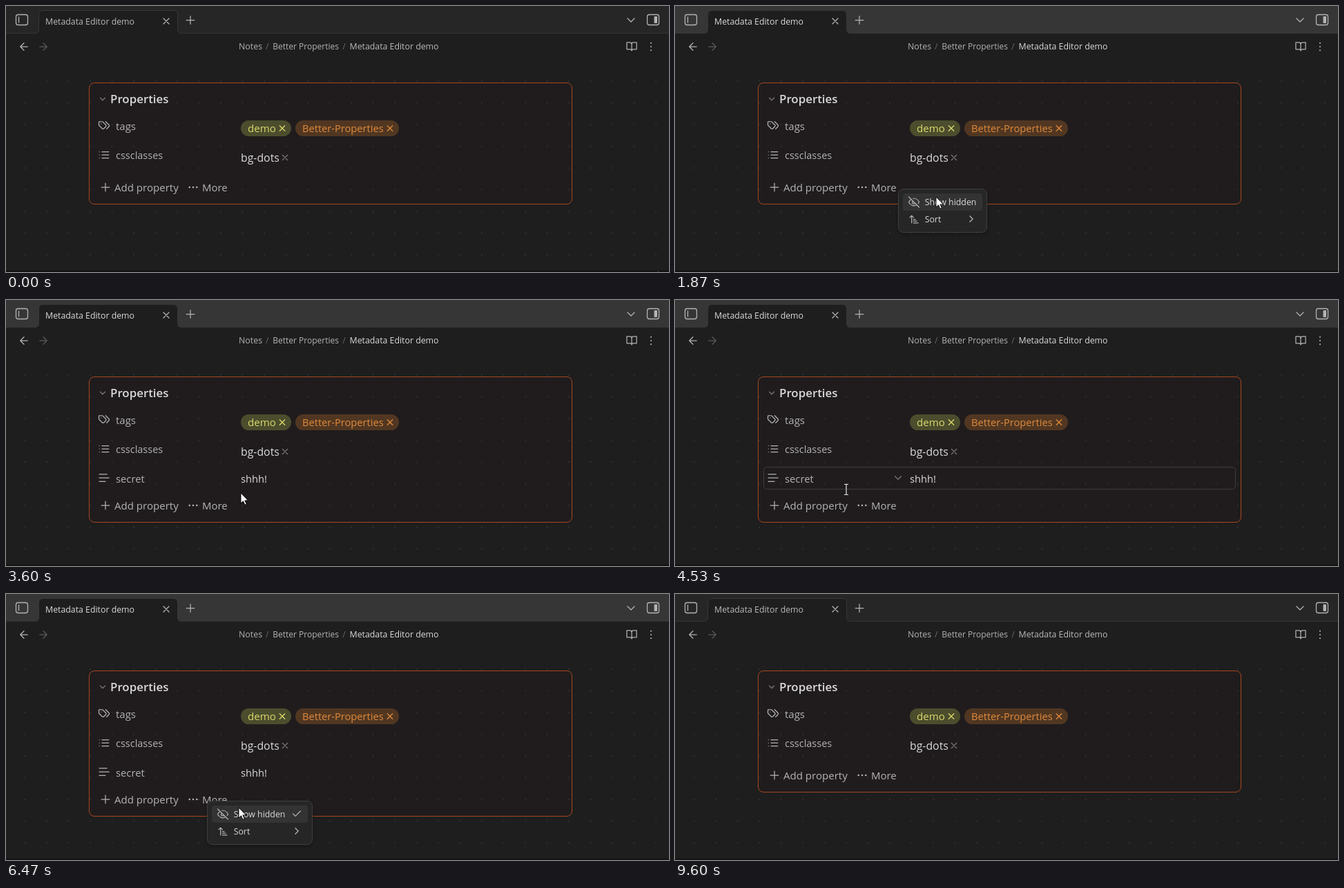
These frames come from a looping animation (960x386 px, 10 s). An HTML page:

```html
<!DOCTYPE html>
<html lang="en">
<head>
<meta charset="utf-8">
<title>Metadata Editor demo</title>
<style>
  html, body { margin: 0; width: 100%; height: 100%; overflow: hidden; background: #1e1e1e; }
  svg { display: block; font-family: "Open Sans", "Noto Sans", sans-serif; }
  .icon { fill: none; stroke-linecap: round; stroke-linejoin: round; }
</style>
</head>
<body>
<svg id="stage" width="960" height="386" viewBox="0 0 960 386"></svg>
<script>
const LOOP = 10000, STEP = 1000 / 15;
const MUTED = '#b3b3b3', BRIGHT = '#dadada', FAINT = '#666';

const ICONS = {
  panel: 'M4 2h16a2 2 0 0 1 2 2v16a2 2 0 0 1-2 2H4a2 2 0 0 1-2-2V4a2 2 0 0 1 2-2z',
  down: 'm6 9 6 6 6-6',
  right: 'm9 18 6-6-6-6',
  plus: 'M5 12h14M12 5v14',
  close: 'M18 6 6 18M6 6l12 12',
  back: 'm12 19-7-7 7-7M19 12H5',
  forward: 'M5 12h14m-7-7 7 7-7 7',
  book: 'M2 4h6a4 4 0 0 1 4 4v13a3 3 0 0 0-3-3H2zM22 4h-6a4 4 0 0 0-4 4v13a3 3 0 0 1 3-3h7z',
  tags: 'm15 5 6.3 6.3a2.4 2.4 0 0 1 0 3.4L17 19M9.6 5.6A2 2 0 0 0 8.2 5H3a1 1 0 0 0-1 1v5.2a2 2 0 0 0 .6 1.4l5.7 5.7a2.4 2.4 0 0 0 3.4 0l3.6-3.6a2.4 2.4 0 0 0 0-3.4zM6.5 9.5h.01',
  list: 'M8 6h13M8 12h13M8 18h13M3 6h.01M3 12h.01M3 18h.01',
  lines: 'M17 5H2M21 12H2M14 19H2',
  dots: 'M5 12h.01M12 12h.01M19 12h.01',
  vdots: 'M12 5v.01M12 12v.01M12 19v.01',
  eyeOff: 'M9.9 9.9a3 3 0 1 0 4.2 4.2M10.7 5.1A10.4 10.4 0 0 1 12 5c7 0 10 7 10 7a13.2 13.2 0 0 1-1.7 2.7M6.6 6.6A13.5 13.5 0 0 0 2 12s3 7 10 7a9.7 9.7 0 0 0 5.4-1.6M2 2l20 20',
  sort: 'm3 8 4-4 4 4M7 4v16M11 12h4M11 16h7M11 20h10',
  check: 'M20 6 9 17l-5-5'
};

// Icons are centred on x, y; weight is the line width in stage pixels.
function icon(name, x, y, size = 18, color = MUTED, weight = 1.25) {
  const k = size / 24;
  return `<path class="icon" d="${ICONS[name]}" stroke="${color}" stroke-width="${weight / k}"
    transform="translate(${x - size / 2} ${y - size / 2}) scale(${k})"/>`;
}
function text(str, x, y, size, color = MUTED, more = '') {
  return `<text x="${x}" y="${y}" font-size="${size}" fill="${color}" ${more}>${str}</text>`;
}
function rect(x, y, w, h, r, fill, more = '') {
  return `<rect x="${x}" y="${y}" width="${w}" height="${h}" rx="${r}" fill="${fill}" ${more}/>`;
}
function pill(str, x, w, size, color, fill) {
  return rect(x, 166, w, 23, 11.5, fill) + text(str, x + 10, 183, size, color)
    + icon('close', x + w - 13, 177.5, 15, color, 1.3);
}

const tabEdge = 'M0 39.5H42Q47.5 39.5 47.5 34V13Q47.5 6.5 54 6.5H242Q248.5 6.5 248.5 13V34Q248.5 39.5 254 39.5H960';
const stage = document.getElementById('stage');
stage.innerHTML = `
  <defs>
    <pattern id="grid" x="11.75" y="93.5" width="31.5" height="31.5" patternUnits="userSpaceOnUse">
      <rect x="15.25" y="15" width="1.2" height="1.2" fill="#4c4c4c"/>
    </pattern>
    <filter id="shadow" x="-20%" y="-20%" width="140%" height="150%">
      <feDropShadow dx="0" dy="2" stdDeviation="3" flood-color="#000" flood-opacity=".3"/>
    </filter>
  </defs>
  ${rect(0, 0, 960, 386, 0, '#1e1e1e')}
  ${rect(0, 96, 960, 288, 0, 'url(#grid)')}
  ${rect(0, 0, 960, 40, 0, '#262626', 'id="bar"')}
  <path d="${tabEdge}V41H0Z" fill="#1e1e1e"/>
  <path id="edge" d="${tabEdge}" fill="none" stroke="#363636"/>
  ${rect(14.5, 12.5, 17, 15, 3, 'none', `stroke="${MUTED}" stroke-width="1.3"`)}
  <path d="M18.5 15.5V24.5" stroke="${MUTED}" stroke-width="1.3"/>
  ${text('Metadata Editor demo', 57, 27, 12.33, MUTED, 'id="tab"')}
  ${icon('close', 232, 22, 16, MUTED, 1.3)}
  ${icon('plus', 267, 20.5, 20)}
  ${icon('down', 905, 20.5, 20)}
  ${rect(928.5, 12.5, 17, 15, 3, 'none', `stroke="${MUTED}" stroke-width="1.3"`)}
  ${rect(938.5, 15, 4.5, 10, 1, MUTED)}
  ${icon('back', 26, 59)}
  ${icon('forward', 54, 59, 18, '#5a5a5a')}
  ${text('Notes', 337, 63, 12.4)}
  ${text('/', 376, 63, 12.4, FAINT)}
  ${text('Better Properties', 386.3, 63, 12.03)}
  ${text('/', 487.3, 63, 12.4, FAINT)}
  ${text('Metadata Editor demo', 497.5, 63, 12.33, MUTED, 'id="crumb"')}
  ${icon('book', 906, 58.5, 17)}
  ${icon('vdots', 934, 59, 18, MUTED, 2.2)}

  ${rect(120.5, 111.5, 699, 176, 7.5, 'rgba(60,12,22,.09)', 'id="box" stroke="#a64820"')}
  ${icon('down', 140, 135, 14, '#777')}
  ${text('Properties', 151, 141, 16.9, BRIGHT, 'font-weight="600"')}
  ${icon('tags', 142, 173)}
  ${text('tags', 159, 180, 15)}
  ${pill('demo', 340, 73, 15.1, '#dcd96c', '#4b4d2d')}
  ${pill('Better-Properties', 419, 150, 14.66, '#e08a3c', '#513722')}
  ${icon('list', 142, 216)}
  ${text('cssclasses', 159, 222, 14.5)}
  ${text('bg-dots', 340, 226, 15.8, BRIGHT)}
  ${icon('close', 404, 220, 15, '#7a7a7a', 1.1)}

  <g id="secret">
    <g id="hover">
      ${rect(128.5, 242.5, 683, 32, 5, 'none', 'stroke="#3f3d3e"')}
      ${icon('down', 323, 258, 18, '#777')}
    </g>
    ${icon('lines', 142.5, 258)}
    ${text('secret', 159, 264.5, 14.8)}
    ${text('shhh!', 340, 264.5, 14.7, BRIGHT)}
  </g>
  <g id="actions">
    ${icon('plus', 144, 263, 20)}
    ${text('Add property', 157, 269, 15.05)}
    ${icon('dots', 271, 263, 18, MUTED, 2.6)}
    ${text('More', 284, 269, 14.95)}
  </g>

  <g id="menu">
    ${rect(323.5, 265.5, 128, 63, 7.5, '#262626', 'id="panel" stroke="#3f3f3f" filter="url(#shadow)"')}
    ${rect(330, 272, 115, 25, 4, '#333', 'id="item"')}
    ${icon('eyeOff', 346, 284.5)}
    ${text('Show hidden', 361.7, 289, 12.35, BRIGHT)}
    ${icon('sort', 346, 309.5, 16)}
    ${text('Sort', 361.7, 314, 12.3, BRIGHT)}
    <g id="more">${icon('right', 429, 309, 17)}</g>
    <g id="tick">${icon('check', 453, 284, 16)}</g>
  </g>

  ${rect(0, 384, 960, 2, 0, '#121212')}
  <g id="cursor">
    <path id="arrow" d="M0 0V15L3.5 11.8 5.9 17.3 8.3 16.3 5.9 10.9H10.5Z" fill="#fff" stroke="#000" stroke-width=".9"/>
    <path id="beam" d="M-3-7.5H3M0-7.5V7.5M-3 7.5H3" fill="none" stroke="#e4e4e4" stroke-width="1.2"/>
  </g>`;

const el = {};
stage.querySelectorAll('[id]').forEach(e => el[e.id] = e);
const show = (e, on) => e.setAttribute('display', on ? 'inline' : 'none');
const move = (e, x, y) => e.setAttribute('transform', `translate(${x} ${y})`);

// Pointer path: time, x, y
const PATH = [
  [0, 944, 384], [330, 640, 342], [670, 130, 280], [1070, 282, 259], [1530, 282, 259],
  [1870, 378, 277], [2200, 404, 282], [3270, 404, 282], [3600, 340, 280], [3800, 300, 257],
  [4070, 190, 246], [4330, 172, 250], [4530, 248, 275], [4730, 309, 277], [5070, 309, 277],
  [5530, 279, 297], [6270, 279, 297], [6470, 337, 310], [7070, 398, 319], [7400, 398, 319],
  [7470, 399, 320], [8000, 399, 320], [8070, 398, 320], [8200, 398, 320],
  [8730, 284, 396], [LOOP, 284, 396]
];

// Speed at a path point, zero where the pointer rests.
function slope(i, c) {
  const a = PATH[i - 1], p = PATH[i], b = PATH[i + 1];
  if (!a || !b) return 0;
  const same = q => q[1] === p[1] && q[2] === p[2];
  return same(a) || same(b) ? 0 : (b[c] - a[c]) / (b[0] - a[0]);
}
function pointer(t) {
  let i = 0;
  while (i < PATH.length - 2 && t >= PATH[i + 1][0]) i++;
  const a = PATH[i], b = PATH[i + 1], span = b[0] - a[0], u = (t - a[0]) / span;
  const s = u * u * (3 - 2 * u);
  return [1, 2].map(c => a[c] + (b[c] - a[c]) * s
    + span * u * (1 - u) * ((1 - u) * slope(i, c) - u * slope(i + 1, c)));
}

function draw(ms) {
  const t = Math.round(Math.floor((ms % LOOP + 4) / STEP) * STEP / 10) * 10;
  const [x, y] = pointer(t);
  const focus = t >= 1130 && t < 9600;
  const secret = t >= 2800 && t < 7470;
  const second = t >= 6070 && t < 7470;
  const menu = second || (t >= 1130 && t < 2800);
  const hover = secret && !menu && y > 238 && y < 276;
  const bottom = secret ? 322 : 287;
  const beam = !menu && (hover || (y > bottom && x > 120 && x < 820));

  el.bar.setAttribute('fill', focus ? '#363636' : '#262626');
  el.tab.setAttribute('fill', focus ? BRIGHT : '#bababa');
  el.crumb.setAttribute('fill', focus ? BRIGHT : '#bababa');
  el.box.setAttribute('height', bottom - 111);
  show(el.secret, secret);
  show(el.hover, hover);
  move(el.actions, 0, secret ? 35 : 0);

  show(el.menu, menu);
  move(el.menu, second ? -32 : 0, second ? 35 : 0);
  el.panel.setAttribute('width', second ? 152 : 128);
  el.item.setAttribute('width', second ? 139 : 115);
  move(el.more, second ? 24 : 0, 0);
  show(el.tick, second);

  move(el.cursor, Math.round(x), Math.round(y));
  show(el.arrow, !beam);
  show(el.beam, beam);
}

const start = performance.now();
function frame() {
  draw(performance.now() - start);
  requestAnimationFrame(frame);
}
frame();
</script>
</body>
</html>
```
